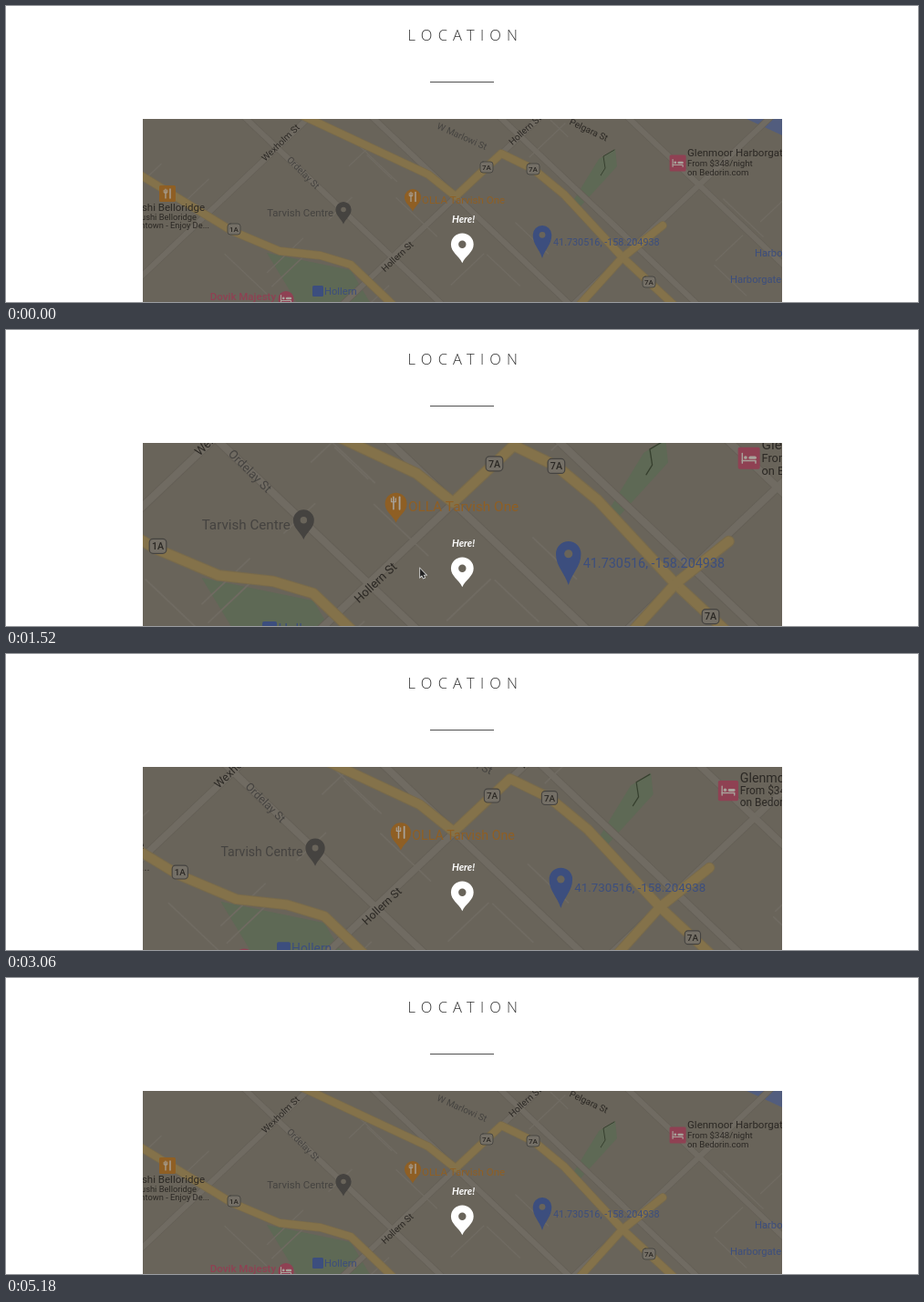
Animation, 1000 px wide and 325 px high, one loop 5.2 s. Source, as an HTML page with a canvas:

```html
<!DOCTYPE html>
<html lang="en">
<head>
<meta charset="utf-8">
<title>Location</title>
<style>
html, body { margin: 0; width: 100%; height: 100%; overflow: hidden; background: #fff; }
canvas { display: block; width: 1000px; height: 325px; }
</style>
</head>
<body>
<canvas id="stage" width="1000" height="325"></canvas>
<script>
const ctx = document.getElementById('stage').getContext('2d');
const LOOP = 5200, ZOOM_IN = 1140, ZOOM_OUT = 2880, ZOOM_MS = 720;
const MAP = { x: 150, y: 124, w: 701, h: 201, cx: 501.5, cy: 268 };
const C = {
  land: '#69645a', edge: '#645f56', street: '#706b62', road: '#84724a', casing: '#786a4b',
  park: '#5e6955', water: '#525d7e', ink: '#2b2824', grey: '#454340',
  orange: '#8f5f24', blue: '#3c4e7e', pink: '#8f4153', pale: '#a8a39b'
};

// CSS "ease" curve: cubic-bezier(.25, .1, .25, 1)
function ease(p) {
  if (p <= 0) return 0;
  if (p >= 1) return 1;
  const bez = (u, a, b) => 3 * a * u * (1 - u) ** 2 + 3 * b * u * u * (1 - u) + u ** 3;
  let lo = 0, hi = 1;
  for (let i = 0; i < 24; i++) {
    const mid = (lo + hi) / 2;
    if (bez(mid, 0.25, 0.25) < p) lo = mid; else hi = mid;
  }
  return bez(lo, 0.1, 1);
}

function zoomAt(t) {
  const p = t < ZOOM_OUT ? ease((t - ZOOM_IN) / ZOOM_MS) : 1 - ease((t - ZOOM_OUT) / ZOOM_MS);
  return 1 + 0.4 * p;
}

function seeded(seed) {
  return () => (seed = seed * 16807 % 2147483647) / 2147483647;
}

function trace(pts) {
  ctx.beginPath();
  for (let i = 0; i < pts.length; i += 2) ctx.lineTo(pts[i], pts[i + 1]);
}

function line(pts, color, width) {
  trace(pts);
  ctx.strokeStyle = color;
  ctx.lineWidth = width;
  ctx.stroke();
}

function area(pts, color) {
  trace(pts);
  ctx.fillStyle = color;
  ctx.fill();
}

function dot(x, y, r, color) {
  ctx.beginPath();
  ctx.arc(x, y, r, 0, Math.PI * 2);
  ctx.fillStyle = color;
  ctx.fill();
}

function label(str, x, y, size, color, align = 'left', weight = 400) {
  ctx.font = `${weight} ${size}px Roboto, sans-serif`;
  ctx.textAlign = align;
  ctx.fillStyle = color;
  ctx.fillText(str, x, y);
}

function streetName(str, x, y, deg, color = C.ink) {
  ctx.save();
  ctx.translate(x, y);
  ctx.rotate(deg * Math.PI / 180);
  label(str, 0, 3.5, 10, color, 'center');
  ctx.restore();
}

function pin(x, y, r, tipY, color) {
  const h = tipY - y;
  ctx.beginPath();
  ctx.arc(x, y, r, Math.PI, 0);
  ctx.bezierCurveTo(x + r, y + h * 0.42, x + r * 0.3, y + h * 0.6, x, tipY);
  ctx.bezierCurveTo(x - r * 0.3, y + h * 0.6, x - r, y + h * 0.42, x - r, y);
  ctx.fillStyle = color;
  ctx.fill();
}

function shield(str, x, y) {
  ctx.beginPath();
  ctx.roundRect(x - 7, y - 6, 14, 12, 3);
  ctx.fillStyle = '#746f66';
  ctx.fill();
  ctx.strokeStyle = C.grey;
  ctx.lineWidth = 0.9;
  ctx.stroke();
  label(str, x, y + 2.9, 8, C.ink, 'center', 500);
}

function square(x, y, size, color) {
  ctx.beginPath();
  ctx.roundRect(x - size / 2, y - size / 2, size, size, 1.5);
  ctx.fillStyle = color;
  ctx.fill();
}

function fork(x, y) {
  line([x - 2, y - 5, x - 2, y + 5], C.pale, 1.2);
  line([x - 3.8, y - 4, x - 3.8, y - 1, x - 0.2, y - 1, x - 0.2, y - 4], C.pale, 0.9);
  line([x + 3, y - 5, x + 3, y + 5], C.pale, 1.4);
}

function bed(x, y) {
  line([x - 5.5, y - 4, x - 5.5, y + 4], C.pale, 1.1);
  line([x - 5.5, y + 2, x + 5.5, y + 2, x + 5.5, y + 4], C.pale, 1.1);
  line([x + 1, y - 0.5, x + 5, y - 0.5], C.pale, 2.4);
  dot(x - 2.8, y - 0.6, 1.4, C.pale);
}

// Straight stretch on the city grid: dir 1 runs down to the right, -1 up to the right.
const gridLine = (x, y, dir, len) => [x - len, y - dir * 0.95 * len, x + len, y + dir * 0.95 * len];

function drawStreets() {
  const streets = [];
  for (let k = 0; k < 3; k++) streets.push(gridLine(224 + 253 * k, 225, -1, 130));
  for (let k = 0; k < 4; k++) streets.push(gridLine(370 + 140 * k, 225, 1, 110));
  for (const s of streets) line(s, C.edge, 7.5);
  for (const s of streets) line(s, C.street, 6);

  const rnd = seeded(71);
  for (let i = 0; i < 22; i++) {
    const x = MAP.x + rnd() * MAP.w, y = MAP.y + rnd() * MAP.h;
    line(gridLine(x, y, i % 2 ? 1 : -1, 8 + rnd() * 18), C.street, 1.4);
  }
}

const roads = [
  [318, 117, 463, 185, 493, 209, 543, 162, 578, 179, 612, 207, 676, 276, 732, 328],
  [630, 327, 676, 276, 720, 241],
  [148, 186, 248, 247, 300, 269, 345, 274, 378, 284, 424, 328]
];

function drawGround() {
  ctx.fillStyle = C.land;
  ctx.fillRect(MAP.x, MAP.y, MAP.w, MAP.h);
  ctx.lineJoin = ctx.lineCap = 'round';
  area([286, 271, 378, 290, 400, 327, 320, 327], C.park);
  area([622, 214, 650, 168, 668, 157, 670, 176, 629, 221], C.park);
  area([810, 123, 853, 123, 853, 143], C.water);
  drawStreets();
  line([652, 186, 657, 178, 655, 165, 667, 158], '#37402f', 1);
  for (const r of roads) line(r, C.casing, 9.5);
  for (const r of roads) line(r, C.road, 7.8);
}

function drawPlaces() {
  streetName('Wexholm St', 301, 150, -44);
  streetName('Ordelay St', 326, 183, 45, C.grey);
  streetName('W Marlowi St', 500, 143, 24, C.grey);
  streetName('Hollern St', 569, 136, -42);
  streetName('Pelgara St', 639, 136, 25);
  streetName('Hollern St', 429, 275, -43);
  shield('1A', 250, 245);
  shield('7A', 527, 177);
  shield('7A', 578, 179);
  shield('7A', 705, 303);

  square(177, 206, 18, C.orange);
  fork(177, 206);
  label('Sushi Belloridge', 218, 225, 11.5, C.ink, 'right');
  label('Sushi Belloridge', 209, 235, 9.3, C.ink, 'right');
  label('Downtown - Enjoy De...', 223, 244, 9.3, C.ink, 'right');

  label('Tarvish Centre', 359, 231, 11.4, C.grey, 'right');
  pin(370, 223.5, 8.6, 239.5, C.grey);
  dot(370, 223.5, 2.8, C.land);
  label('OLLA Tarvish One', 456, 216.5, 11.5, C.orange);
  pin(446, 210, 9, 225.5, C.orange);
  fork(446, 209.5);
  label('41.730516, -158.204938', 600, 262.5, 10.8, C.blue);
  pin(588, 251.3, 10.3, 277, C.blue);
  dot(588, 251.3, 3.4, C.land);

  square(736.6, 172.5, 18, C.pink);
  bed(736.6, 172.5);
  label('Glenmoor Harborgate', 747, 165, 11.5, C.ink);
  label('From $348/night', 747, 176, 9.6, C.ink);
  label('on Bedorin.com', 747, 186, 9.6, C.ink);

  label('Dovik Majesty', 296, 323, 11.5, C.pink, 'right', 500);
  pin(307, 321.5, 8.6, 338, C.pink);
  bed(307, 321.5);
  square(342, 313, 12, C.blue);
  label('Hollern', 349, 316.5, 11.2, C.blue);
  label('Harborgate', 821, 275, 11.2, C.blue);
  label('Harborgate', 794, 304, 11.2, C.blue);
}

function drawMap(scale) {
  ctx.save();
  ctx.beginPath();
  ctx.rect(MAP.x, MAP.y, MAP.w, MAP.h);
  ctx.clip();
  ctx.translate(MAP.cx, MAP.cy);
  ctx.scale(scale, scale);
  ctx.translate(-MAP.cx, -MAP.cy);
  drawGround();
  drawPlaces();
  ctx.restore();
}

// Pointer stops: time, x, y
const stops = [[1170, 408, 330], [1320, 434, 275], [1800, 487, 241], [2180, 490, 243], [2580, 505, 330]];

function drawPointer(t) {
  const i = stops.findIndex(s => t < s[0]);
  if (i < 1) return;
  const [t0, x0, y0] = stops[i - 1], [t1, x1, y1] = stops[i];
  const p = (t - t0) / (t1 - t0), q = p * p * (3 - 2 * p);
  ctx.save();
  ctx.translate(x0 + (x1 - x0) * q, y0 + (y1 - y0) * q);
  trace([0, 0, 0, 9, 2, 7.2, 3.5, 10.4, 5, 9.7, 3.6, 6.6, 6.4, 6.6]);
  ctx.closePath();
  ctx.strokeStyle = '#ddd';
  ctx.lineWidth = 1.6;
  ctx.stroke();
  ctx.fillStyle = '#222';
  ctx.fill();
  ctx.restore();
}

function drawHeading() {
  ctx.font = '300 16.5px "Open Sans", sans-serif';
  ctx.letterSpacing = '6.2px';
  ctx.textAlign = 'left';
  ctx.fillStyle = '#333';
  ctx.fillText('LOCATION', 440.5, 38.3);
  ctx.letterSpacing = '0px';
  ctx.fillStyle = '#505050';
  ctx.fillRect(465, 83, 70, 1);
}

function drawMarker() {
  ctx.font = 'italic 700 11px Lato, sans-serif';
  ctx.textAlign = 'center';
  ctx.fillStyle = '#fff';
  ctx.fillText('Here!', 501.5, 237.5);
  pin(500.3, 261.8, 12.4, 282.3, '#fff');
  dot(500.3, 261.8, 4.2, C.land);
}

function draw(t) {
  ctx.fillStyle = '#fff';
  ctx.fillRect(0, 0, 1000, 325);
  drawHeading();
  drawMap(zoomAt(t));
  drawMarker();
  drawPointer(t);
}

function tick() {
  draw(performance.now() % LOOP);
  requestAnimationFrame(tick);
}
tick();
</script>
</body>
</html>
```
